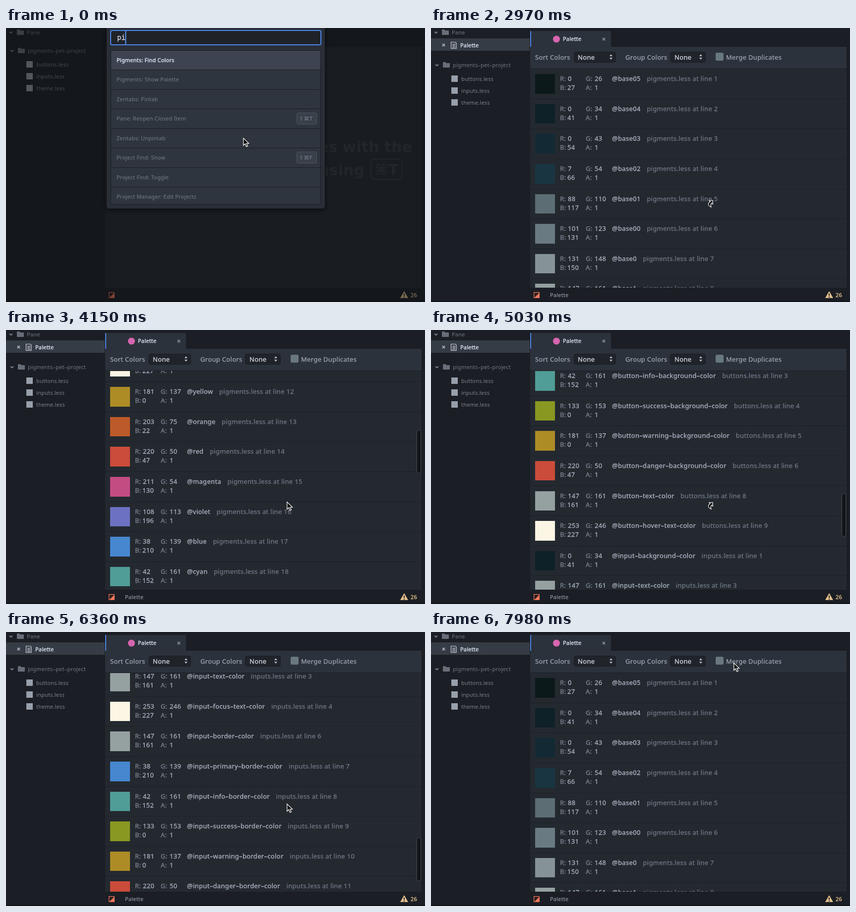
Recreate the animation shown at these times as an HTML page with a canvas. Size 845x554 px, loop 8 s.

```html
<!DOCTYPE html>
<html lang="en">
<head>
<meta charset="utf-8">
<title>Palette</title>
<style>
html, body { margin: 0; width: 100%; height: 100%; overflow: hidden; background: #1b1e24; }
canvas { display: block; width: 845px; height: 554px; }
</style>
</head>
<body>
<canvas id="stage" width="845" height="554"></canvas>
<script>
const ctx = document.getElementById('stage').getContext('2d');
const LOOP = 8000, STEP = 147.8, ROW = 60.6, LIST_TOP = 83.1, LIST_H = 442;
const SANS = '"Noto Sans", "Open Sans", sans-serif';
const WIDE = '"DejaVu Sans", sans-serif';
const MONO = '"DejaVu Sans Mono", monospace';
const BG = '#1b1e24', PANE = '#242930', TIP = '#373a41', BLUE = '#4d86ea';

const colors = {
  base05: [0, 26, 27], base04: [0, 34, 41], base03: [0, 43, 54], base02: [7, 54, 66],
  base01: [88, 110, 117], base00: [101, 123, 131], base0: [131, 148, 150], base1: [147, 161, 161],
  base2: [238, 232, 213], base3: [253, 246, 227], yellow: [181, 137, 0], orange: [203, 75, 22],
  red: [220, 50, 47], magenta: [211, 54, 130], violet: [108, 113, 196], blue: [38, 139, 210],
  cyan: [42, 161, 152], green: [133, 153, 0]
};
const names = Object.keys(colors);
const rows = [
  ...names.map((name, i) => ({ name, rgb: colors[name], ref: 'pigments.less at line ' + (i < 10 ? i + 1 : i + 2) })),
  ...parse('buttons.less', `1 button-background-color base02
    2 button-primary-background-color blue
    3 button-info-background-color cyan
    4 button-success-background-color green
    5 button-warning-background-color yellow
    6 button-danger-background-color red
    8 button-text-color base1
    9 button-hover-text-color base3`),
  ...parse('inputs.less', `1 input-background-color base04
    3 input-text-color base1
    4 input-focus-text-color base3
    6 input-border-color base1
    7 input-primary-border-color blue
    8 input-info-border-color cyan
    9 input-success-border-color green
    10 input-warning-border-color yellow
    11 input-danger-border-color red`),
  ...parse('theme.less', `1 background-color base03
    2 text-color base1`)
];

function parse(file, text) {
  return text.split('\n').map(entry => {
    const [line, name, color] = entry.trim().split(' ');
    return { name, rgb: colors[color], ref: `${file} at line ${line}` };
  });
}

// Screen profile: a small bleed between channels in linear light
function swatch(rgb) {
  const [r, g, b] = rgb.map(c => (c / 255) ** 2.2);
  const mixed = [0.83 * r + 0.17 * g, 0.06 * r + 0.94 * g, 0.02 * r + 0.02 * g + 0.96 * b];
  return `rgb(${mixed.map(c => Math.round(255 * c ** (1 / 2.2)))})`;
}

// keys: [step, value, value...]; linear between them
function track(keys, k) {
  if (k <= keys[0][0]) return keys[0].slice(1);
  for (let i = 1; i < keys.length; i++) {
    const a = keys[i - 1], b = keys[i];
    if (k <= b[0]) {
      const p = (k - a[0]) / (b[0] - a[0]);
      return a.slice(1).map((v, j) => v + (b[j + 1] - v) * p);
    }
  }
  return keys[keys.length - 1].slice(1);
}

const scrollKeys = [[22, 0], [23, 55], [28, 584], [34, 1222], [40, 1800], [42, 1800], [43, 1649.1],
  [44, 1150], [45, 620], [46, 180], [47, 0]];
const mouseKeys = [[18, 478, 222], [19, 530, 300], [20, 566, 347], [49, 566, 347], [50, 571, 318],
  [51, 582, 235], [52, 596, 145], [53, 607, 85], [54, 610, 62]];

function rect(x, y, w, h, color) {
  ctx.fillStyle = color;
  ctx.fillRect(x, y, w, h);
}

function box(x, y, w, h, r, fill, stroke, line = 1) {
  ctx.beginPath();
  ctx.roundRect(x, y, w, h, r);
  if (fill) { ctx.fillStyle = fill; ctx.fill(); }
  if (stroke) { ctx.strokeStyle = stroke; ctx.lineWidth = line; ctx.stroke(); }
}

function poly(points, fill) {
  ctx.beginPath();
  points.forEach(([x, y]) => ctx.lineTo(x, y));
  ctx.closePath();
  ctx.fillStyle = fill;
  ctx.fill();
}

function setType(font, spacing) {
  ctx.font = font;
  ctx.letterSpacing = spacing + 'px';
}

function print(str, x, y, color, weight) {
  ctx.fillStyle = color;
  ctx.fillText(str, x, y);
  if (weight) {
    ctx.strokeStyle = color;
    ctx.lineWidth = weight;
    ctx.lineJoin = 'round';
    ctx.strokeText(str, x, y);
  }
}

// The interface face has wide hyphens
const wideHyphens = str => String(str).replace(/-/g, '–');

function small(str, x, mid, color, weight = 0) {
  setType('11px ' + SANS, 0.2);
  print(wideHyphens(str), x, mid + 4, color, weight);
}

function body(str, x, mid, color, weight = 0.25) {
  const label = wideHyphens(str);
  setType('13px ' + SANS, 0.32);
  print(label, x, mid + 5, color, weight);
  return ctx.measureText(label).width;
}

function cross(x, y, color) {
  ctx.beginPath();
  for (const s of [-1, 1]) {
    ctx.moveTo(x - 2.6, y - 2.6 * s);
    ctx.lineTo(x + 2.6, y + 2.6 * s);
  }
  ctx.strokeStyle = color;
  ctx.lineWidth = 1.8;
  ctx.stroke();
}

function folder(x, y, label) {
  ctx.beginPath();
  ctx.moveTo(x - 15, y - 1.5);
  ctx.lineTo(x - 12, y + 1.5);
  ctx.lineTo(x - 9, y - 1.5);
  ctx.strokeStyle = '#7b8290';
  ctx.lineWidth = 1.8;
  ctx.stroke();
  box(x, y - 6, 6, 4, 1, '#686e79');
  box(x, y - 4, 14, 9, 1, '#686e79');
  small(label, x + 20, y, '#727986');
}

function sidebar(open) {
  folder(22, 9, 'Pane');
  let y = 46;
  if (open) {
    rect(0, 21, 199, 25, '#363c45');
    cross(25.5, 34.5, '#aab1bd');
    box(40.5, 28.5, 10.5, 13, [0, 3, 0, 0], null, '#d0d5de', 1.2);
    for (let i = 0; i < 4; i++) rect(43, 32 + i * 2.3, 6, 1, '#d0d5de');
    small('Palette', 59, 35, '#dbe2f2', 0.4);
    y = 75;
  }
  folder(24, y, 'pigments-pet-project');
  ['buttons.less', 'inputs.less', 'theme.less'].forEach((file, i) => {
    const mid = y + 28 + i * 24;
    rect(41, mid - 7, 13, 13, '#979fab');
    small(file, 61, mid, '#7b828e');
  });
}

function statusBar(open) {
  rect(0, 525, 845, 29, BG);
  rect(0, 551, 845, 3, '#14171b');
  rect(207.5, 534.5, 11, 11, '#2a2020');
  poly([[208, 546], [219, 546], [219, 535]], '#f4785c');
  ctx.strokeStyle = '#f4785c';
  ctx.lineWidth = 1.2;
  ctx.strokeRect(207.6, 534.6, 10.8, 10.8);
  if (open) small('Palette', 240, 540, '#a3abb8');
  poly([[803, 532], [811, 546], [795, 546]], '#e2c08d');
  rect(802, 537, 2, 4.5, BG);
  rect(802, 543, 2, 2, BG);
  small('26', 816, 540, '#e2c08d', 0.4);
}

function tips(late) {
  setType('bold 30px ' + WIDE, 0);
  ctx.strokeStyle = TIP;
  if (late) {
    print('You can toggle the Tree View with', 203, 251, TIP);
    print('⌘', 805, 250, TIP);
    print('\\', 509, 297, TIP);
    ctx.lineWidth = 2;
    ctx.beginPath();
    ctx.moveTo(835, 218); ctx.lineTo(805, 218);
    ctx.quadraticCurveTo(798, 218, 798, 225); ctx.lineTo(798, 252);
    ctx.quadraticCurveTo(798, 259, 805, 259); ctx.lineTo(835, 259);
    ctx.moveTo(509, 265); ctx.lineTo(520, 265);
    ctx.quadraticCurveTo(527, 265, 527, 272); ctx.lineTo(527, 299);
    ctx.quadraticCurveTo(527, 306, 520, 306); ctx.lineTo(509, 306);
    ctx.stroke();
  } else {
    ctx.textAlign = 'right';
    print('You can quickly open files with the', 819, 251, TIP);
    print('Fuzzy Finder using', 723, 298, TIP);
    ctx.textAlign = 'left';
    print('⌘T', 743, 297, TIP);
    box(736, 265, 63, 41, 7, null, TIP, 2);
  }
}

function select(x, w, label, textX) {
  box(x + 0.5, 48.5, w - 1, 21, 4, '#20242a', '#191c21');
  body(label, textX, 59, '#d4d9e2', 0.3);
  const a = x + w - 10;
  poly([[a - 3, 57], [a + 3, 57], [a, 53]], '#b4bbc7');
  poly([[a - 3, 60], [a + 3, 60], [a, 64]], '#b4bbc7');
}

function header() {
  box(200, 6, 163, 33, [3, 3, 0, 0], '#2c323b');
  rect(200, 6, 2, 32, BLUE);
  ctx.beginPath();
  ctx.arc(253, 22.5, 7, 0, 7);
  ctx.fillStyle = '#d765b0';
  ctx.fill();
  small('Palette', 266, 22, '#dbe2f2', 0.4);
  cross(348.5, 22.5, '#858c98');
  rect(200, 38, 638, 44, '#2c323b');
  rect(200, 82, 638, 1, '#1c2026');
  body('Sort Colors', 210, 59, '#a0a8b5');
  select(288, 85, 'None', 296);
  body('Group Colors', 392, 59, '#a0a8b5');
  select(482, 72, 'None', 491);
  box(574, 50, 16, 16, 3, '#69777e');
  body('Merge Duplicates', 595, 59, '#a0a8b5');
}

function channel(label, value, x, valueX, mid) {
  body(label, x, mid, '#727b87', 0.45);
  body(value, valueX, mid, '#a9b2bf', 0.3);
}

// Draws the visible rows and tells whether the pointer is on a link
function list(scroll, mx, my) {
  let onLink = false;
  ctx.save();
  ctx.beginPath();
  ctx.rect(200, 83, 638, LIST_H);
  ctx.clip();
  rows.forEach((row, i) => {
    const y = LIST_TOP + i * ROW - scroll;
    if (y < LIST_TOP - ROW || y > LIST_TOP + LIST_H) return;
    const top = Math.round(y), mid = top + 19, [r, g, b] = row.rgb;
    rect(200, Math.round(y + ROW - 1), 638, 1, '#1c2026');
    rect(210, top + 10, 40, Math.round(y + ROW - 11) - top - 10, swatch(row.rgb));
    channel('R:', r, 260, 276, mid);
    channel('G:', g, 312, 330, mid);
    channel('B:', b, 260, 275, mid + 18);
    channel('A:', 1, 312, 330, mid + 18);
    const refX = 365 + body('@' + row.name, 365, mid, '#aeb6c3', 0.3) + 12.5;
    const refW = body(row.ref, refX, mid, '#737b87');
    const dy = my - mid;
    if (mx > refX && mx < refX + refW && dy > -10 && dy < 14) onLink = true;
  });
  ctx.restore();
  return onLink;
}

function palette(full, scroll, bar, mx, my) {
  header();
  const onLink = full && list(scroll, mx, my);
  if (bar) {
    ctx.globalAlpha = bar;
    box(828.5, 85.5 + scroll * 0.2005, 8, 87, 4, '#111418', '#454b54');
    ctx.globalAlpha = 1;
  }
  return onLink;
}

const longList = ['Pigments: Find Colors', 'Pigments: Show Palette', 'Zentabs: Pintab',
  'Pane: Reopen Closed Item|⇧⌘T', 'Zentabs: Unpintab', 'Project Find: Show|⇧⌘F',
  'Project Find: Toggle', 'Project Manager: Edit Projects'];
const shortList = [...longList.slice(0, 2), 'Incompatible Packages: Reload Atom And Recheck Packages'];

function popup(query, items, selected, caret) {
  const bottom = items.length > 3 ? 356 : 163;
  ctx.save();
  ctx.shadowColor = 'rgba(0,0,0,.55)';
  ctx.shadowBlur = 10;
  ctx.shadowOffsetY = 3;
  box(203, -10, 440, bottom + 19, 5, '#292e37');
  ctx.restore();
  box(211, 5, 424, 29, 3, '#1f2329', BLUE, 2);
  setType('14px ' + MONO, 0);
  print(query, 224, 24, '#d3dbea', 0.3);
  if (caret) {
    ctx.globalAlpha = caret;
    rect(224 + query.length * 8.43 - 0.5, 6, 2, 27, '#5f93ee');
    ctx.globalAlpha = 1;
  }
  items.forEach((item, i) => {
    const y = Math.round(45 + i * 39.45), h = Math.min(39.45, bottom - y), on = i === selected;
    const [label, keys] = item.split('|');
    rect(212, y, 422, h, on ? '#3d4350' : '#2f353e');
    rect(212, y, 422, 1, '#1b1e23');
    small(label, 223, y + 20, on ? '#dbe3f6' : '#757d89', on ? 0.45 : 0);
    if (keys) {
      box(586.5, y + 8.5, 40, 23, 3, '#3a404a', '#4d545f');
      setType('11px ' + WIDE, 0.3);
      print(keys, 591, y + 24, '#7a818d');
    }
  });
  ctx.strokeStyle = '#1b1e23';
  ctx.lineWidth = 1;
  ctx.strokeRect(211.5, 45.5, 423, bottom - 45);
}

function outlined() {
  ctx.closePath();
  ctx.fillStyle = '#0a0a0a';
  ctx.fill();
  ctx.strokeStyle = '#f2f2f2';
  ctx.lineWidth = 1.3;
  ctx.lineJoin = 'miter';
  ctx.stroke();
}

function arrow(x, y) {
  ctx.beginPath();
  [[0, 0], [0, 14.5], [3.4, 11.4], [6, 17], [8.6, 15.8], [6.1, 10.5], [10.8, 10.5]]
    .forEach(([dx, dy]) => ctx.lineTo(x + 0.8 + dx, y + 0.8 + dy));
  outlined();
}

function hook(x, y) {
  ctx.beginPath();
  ctx.moveTo(x - 5, y + 1.8);
  ctx.lineTo(x + 2.2, y + 1.8);
  ctx.lineTo(x + 2.2, y + 9);
  ctx.lineTo(x, y + 7);
  ctx.quadraticCurveTo(x - 3, y + 10, x - 1, y + 15);
  ctx.quadraticCurveTo(x - 8.5, y + 12, x - 6, y + 7);
  ctx.quadraticCurveTo(x - 5, y + 5, x - 2.8, y + 4);
  outlined();
}

function caretAt(k) {
  if (k === 5 || k === 10) return 0.5;
  return k < 5 || k === 8 || k === 9 ? 1 : 0;
}

function barAt(k) {
  if (k < 23 || k > 51) return 0;
  return k < 50 ? 1 : (52 - k) / 3;
}

function draw(time) {
  const k = Math.floor((time + 6) / STEP);
  const open = k >= 14;
  const [mx, my] = track(mouseKeys, k);
  let onLink = false;
  rect(0, 0, 845, 554, BG);
  rect(200, 38, 638, 487, PANE);
  sidebar(open);
  if (open) onLink = palette(k >= 15, track(scrollKeys, k)[0], barAt(k), mx, my);
  else tips(k >= 7);
  statusBar(open);
  if (k < 13) {
    rect(0, 0, 845, 554, 'rgba(14,16,18,.5)');
    popup('pigm'.slice(0, k + 2), k ? shortList : longList, k < 8 ? 0 : 1, caretAt(k));
  }
  (onLink ? hook : arrow)(mx, my);
}

const start = performance.now();
function tick() {
  draw((performance.now() - start) % LOOP);
  requestAnimationFrame(tick);
}
tick();
</script>
</body>
</html>
```
